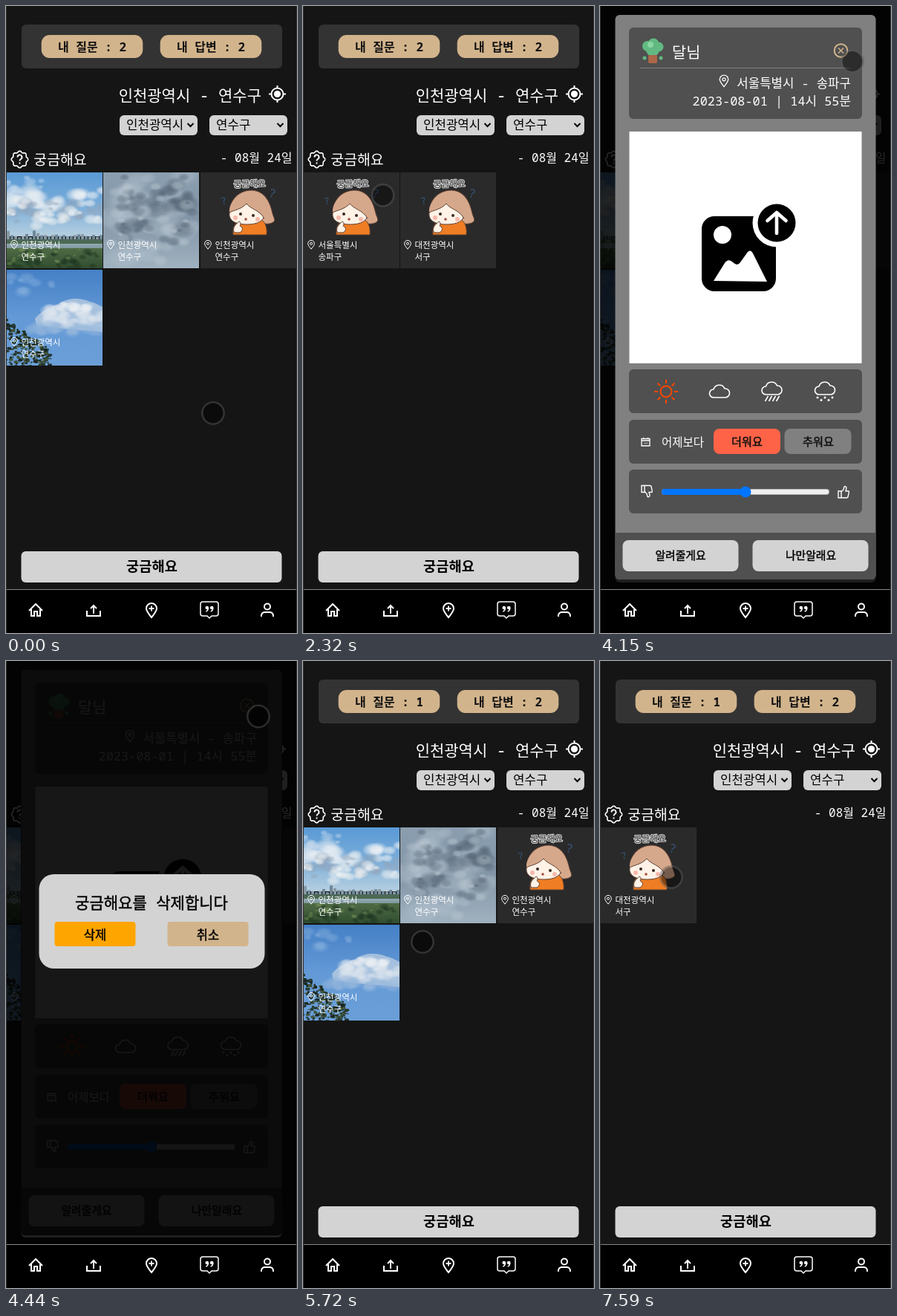
Animation of 392x844 px, one loop 8 s. Source, as an HTML page with a canvas:

```html
<!DOCTYPE html>
<html lang="ko">
<head>
<meta charset="utf-8">
<title>궁금해요</title>
<style>
html, body { margin: 0; width: 100%; height: 100%; overflow: hidden; background: #151515; }
canvas { display: block; width: 392px; height: 844px; }
</style>
</head>
<body>
<canvas id="stage" width="392" height="844"></canvas>
<script>
const W = 392, H = 844, LOOP = 8000, TILE = 129;
const TAN = '#d2b48c', LIGHT = '#d3d3d3', PANEL = '#505050', GRAY = '#808080';
const FONT = '"Noto Sans Mono", "Noto Sans CJK KR", "Noto Sans CJK", monospace';
let g = document.getElementById('stage').getContext('2d');

// ---------- helpers ----------
function box(x, y, w, h, r, fill) {
  g.fillStyle = fill;
  g.beginPath();
  g.roundRect(x, y, w, h, r);
  g.fill();
}

function disc(x, y, r, fill) {
  g.fillStyle = fill;
  g.beginPath();
  g.arc(x, y, r, 0, 7);
  g.fill();
}

function ring(x, y, r, width, color) {
  g.strokeStyle = color;
  g.lineWidth = width;
  g.beginPath();
  g.arc(x, y, r, 0, 7);
  g.stroke();
}

// y is the optical middle of the line; 500 is regular with a hairline outline
function text(s, x, y, size, color = '#fff', align = 'left', weight = 400) {
  g.font = `${weight} ${size}px ${FONT}`;
  g.textAlign = align;
  g.fillStyle = color;
  g.fillText(s, x, y + size * 0.37);
  if (weight === 500) {
    g.strokeStyle = color;
    g.lineWidth = 0.45;
    g.strokeText(s, x, y + size * 0.37);
  }
}

function at(x, y, draw, sx = 1, sy = sx) {
  g.save();
  g.translate(x, y);
  g.scale(sx, sy);
  draw();
  g.restore();
}

function line(d, color = '#fff', width = 2) {
  g.strokeStyle = color;
  g.lineWidth = width;
  g.stroke(new Path2D(d));
}

function shape(d, fill, edge) {
  g.fillStyle = fill;
  g.fill(new Path2D(d));
  if (edge) line(d, edge, 1);
}

function random(seed) {
  return () => {
    seed = (seed + 0x6d2b79f5) | 0;
    let v = Math.imul(seed ^ (seed >>> 15), 1 | seed);
    v = (v + Math.imul(v ^ (v >>> 7), 61 | v)) ^ v;
    return ((v ^ (v >>> 14)) >>> 0) / 4294967296;
  };
}

// ---------- pictures ----------
function picture(draw) {
  const c = document.createElement('canvas'), main = g;
  c.width = c.height = TILE;
  g = c.getContext('2d');
  draw();
  g = main;
  return c;
}

function gradient(y, h, ...colors) {
  const fill = g.createLinearGradient(0, y, 0, y + h);
  colors.forEach((c, i) => fill.addColorStop(i / (colors.length - 1), c));
  g.fillStyle = fill;
  g.fillRect(0, y, TILE, h);
}

function puff(x, y, rx, ry, rgb, a) {
  at(x, y, () => {
    const fill = g.createRadialGradient(0, 0, 0, 0, 0, 1);
    fill.addColorStop(0, `rgba(${rgb},${a})`);
    fill.addColorStop(0.55, `rgba(${rgb},${a * 0.75})`);
    fill.addColorStop(1, `rgba(${rgb},0)`);
    disc(0, 0, 1, fill);
  }, rx, ry);
}

function puffs(seed, n, x, y, w, h, size, rgb, a) {
  const rnd = random(seed);
  for (let i = 0; i < n; i++) {
    const r = size * (0.5 + rnd());
    puff(x + rnd() * w, y + rnd() * h, r * 1.5, r, rgb, a);
  }
}

const river = picture(() => {
  gradient(0, 86, '#5a9ad6', '#79acd9', '#b5cfe0');
  puffs(5, 22, 0, 24, 129, 24, 8, '234,239,243', 0.7);
  puffs(6, 7, 0, 6, 50, 14, 5, '205,222,237', 0.5);
  puffs(8, 24, 0, 40, 129, 26, 6, '146,164,184', 0.55);
  puffs(3, 26, 0, 36, 129, 38, 5, '238,241,242', 0.65);
  const rnd = random(4);
  for (let x = 0; x < TILE; x += 5) {
    const h = 3 + rnd() * (x < 45 ? 10 : 5);
    box(x, 91 - h, 4, h, 0, x % 2 ? '#6f8798' : '#8799a5');
  }
  gradient(90, 6, '#4d685d', '#4b6a4c');
  gradient(96, 7, '#93abb3', '#7c949b');
  gradient(102, 27, '#4f6b45', '#304d30');
  puffs(9, 34, 0, 106, 129, 23, 3.5, '30,53,32', 0.6);
  puffs(12, 20, 0, 104, 129, 20, 2.5, '115,142,85', 0.6);
});

const overcast = picture(() => {
  gradient(0, TILE, '#8b9eaf', '#8295a6', '#a0b2c0');
  puffs(21, 26, 0, 0, 129, 125, 12, '176,191,204', 0.5);
  puffs(34, 26, 15, 5, 100, 95, 9, '82,98,115', 0.5);
  puffs(40, 22, 10, 15, 110, 105, 6, '190,202,211', 0.5);
  puffs(43, 16, 20, 10, 100, 80, 5, '74,89,106', 0.4);
});

const summer = picture(() => {
  gradient(0, TILE, '#4580c6', '#6399d6', '#6b9fd8');
  puffs(51, 9, 0, 8, 70, 22, 6, '150,187,226', 0.4);
  shape('M38 66C48 54 60 50 72 45C84 37 100 38 112 43C121 45 126 49 129 50V84C100 80 70 81 40 74Z', 'rgba(190,207,226,.75)');
  puffs(55, 26, 52, 50, 77, 22, 7, '222,230,238', 0.6);
  puffs(58, 12, 70, 42, 40, 12, 6, '233,238,243', 0.7);
  puffs(60, 16, 25, 73, 104, 12, 6, '150,183,220', 0.6);
  const rnd = random(77);
  for (let i = 0; i < 260; i++) {
    const x = rnd() * 60, y = 64 + x * 0.7 + rnd() * (66 - x * 0.7);
    box(x - 4, y, 1 + rnd() * 5, 1 + rnd() * 3, 1, ['#26372b', '#40543a', '#1b2923'][i % 3]);
  }
});

const girl = picture(() => {
  const hair = '#d6a88b', edge = '#604235', skin = '#fff2e7';
  box(0, 0, TILE, TILE, 0, '#2a2a2a');
  at(66, 15, () => {
    g.rotate(-0.03);
    g.font = `400 11.7px ${FONT}`;
    g.textAlign = 'center';
    g.lineJoin = 'round';
    g.strokeStyle = '#d4d4d4';
    g.lineWidth = 2.2;
    g.strokeText('궁금해요', 0, 4.5);
    text('궁금해요', 0, 0.2, 11.7, '#2b2b2b', 'center');
  });
  at(31, 38, () => { g.rotate(-0.25); text('?', 0, 0, 13, '#35557d', 'center'); });
  at(97, 28, () => { g.rotate(0.2); text('?', 0, 0, 16, '#35557d', 'center'); });
  shape('M40 60C36 40 50 24 69 24C88 25 94 42 97 55C98 60 102 64 98 67C92 71 84 68 78 70L44 66Z', hair, edge);
  shape('M44 84C43 74 46 66 56 65L82 64C88 67 90 76 89 84Z', '#ef7d23', edge);
  shape('M39 55C41 45 50 41 63 41C77 41 86 48 86 56C86 65 77 70 63 70C47 70 38 65 39 55Z', skin, edge);
  shape('M39 54C44 51 55 50 62 42C68 50 79 50 86 62C92 60 93 47 87 38C80 26 64 24 54 30C43 36 38 46 39 54Z', hair);
  line('M39 54C44 51 55 50 62 42C68 50 79 50 86 62', edge, 1);
  disc(54, 56, 2, '#3b2924');
  disc(71, 58, 2, '#3b2924');
  disc(47, 61, 3, '#f7b9ac');
  disc(77, 63, 3, '#f7b9ac');
  disc(61, 63, 1.8, '#a74c40');
  shape('M45 80C43 73 48 70 52 66C55 67 54 71 53 72C58 74 57 79 53 81H46Z', skin, edge);
});

// ---------- icons ----------
const PIN = 'M0 10C-5 4-7 1-7-2A7 7 0 0 1 7-2C7 1 5 4 0 10Z';
const CLOUD = 'M-8 9A5.5 5.5 0 0 1-8-2A8 8 0 0 1 7-3A6 6 0 0 1 8 9Z';
const THUMB = 'M-7-1H-3V8H-7ZM-3 0L0-3L1-7Q4-8 4-5L3-1H7Q8 0 7 2L6 7Q5 8 4 8H-3';

function pin(x, y, scale) {
  at(x, y, () => { line(PIN, '#fff', 1.6); ring(0, -2, 2.5, 1.5, '#fff'); }, scale);
}

function badge() {
  g.beginPath();
  for (let i = 0; i <= 96; i++) {
    const a = i / 96 * Math.PI * 2, r = 10.4 + 0.9 * Math.cos(a * 8);
    g.lineTo(18.5 + r * Math.cos(a), 206.5 + r * Math.sin(a));
  }
  g.strokeStyle = '#fff';
  g.lineWidth = 1.6;
  g.stroke();
  at(18.5, 206, () => line('M-3-2.5A3 3 0 1 1 1.5 0Q0 1 0 2.5M0 4.5V6.5', '#fff', 1.9));
}

function locator() {
  at(365.5, 118.5, () => {
    ring(0, 0, 8, 2, '#fff');
    disc(0, 0, 4.6, '#fff');
    line('M0-11.5V-8M0 8V11.5M-11.5 0H-8M8 0H11.5');
  });
}

function nav() {
  box(0, 785, W, 59, 0, '#000');
  box(0, 785, W, 1, 0, '#888');
  at(40, 813, () => line('M-9 1L0-8L9 1M-6-1V8H-2V2H2V8H6V-1'));
  at(118, 814, () => line('M-9 0V7H9V0M0 4V-6M-4-3L0-7L4-3'));
  at(196, 813, () => line(PIN + 'M-3.5-2H3.5M0-5.5V1.5'));
  at(274, 813, () => {
    line('M-9-11H9Q12-11 12-8V5Q12 8 9 8H3L0 11L-3 8H-9Q-12 8-12 5V-8Q-12-11-9-11Z', '#fff', 1.5);
    for (const x of [-3.2, 3.2]) {
      disc(x, -3, 2.3, '#fff');
      at(x, -3, () => line('M1.6 0Q1.6 4-1.5 5', '#fff', 1.5));
    }
  });
  at(352, 813, () => {
    ring(0, -4.5, 4, 2, '#fff');
    line('M-8 9V7A5 5 0 0 1-3 3H3A5 5 0 0 1 8 7V9');
  });
}

// ---------- screens ----------
const home = [
  [river, '인천광역시', '연수구'],
  [overcast, '인천광역시', '연수구'],
  [girl, '인천광역시', '연수구'],
  [summer, '인천광역시', '연수구']
];
const mine = [[girl, '서울특별시', '송파구'], [girl, '대전광역시', '서구']];

function select(x, label) {
  box(x, 147, 105, 27, 6, LIGHT);
  text(label, x + 9, 160, 16.8, '#000', 'left', 300);
  at(x + 95.5, 160, () => line('M-4-2L0 2L4-2', '#000'));
}

function page(tiles, questions) {
  box(0, 0, W, H, 0, '#151515');
  box(21, 25, 351, 59, 6, '#333');
  [[47.7, '내 질문 : ' + questions], [207.7, '내 답변 : 2']].forEach(([x, s]) => {
    box(x, 39, 136.6, 31, 11, TAN);
    text(s, x + 68.3, 55.5, 16, '#111', 'center', 600);
  });
  text('인천광역시 - 연수구', 344, 120, 21, '#fff', 'right');
  locator();
  select(153, '인천광역시');
  select(274, '연수구');
  badge();
  text('궁금해요', 37.3, 206.6, 19.4);
  text('- 08월 24일', 385.5, 204.5, 16, '#fff', 'right');
  tiles.forEach(([image, city, area], i) => {
    const x = 1 + i % 3 * 130.5 | 0, y = 224 + Math.floor(i / 3) * 131;
    g.drawImage(image, x, y, TILE, TILE);
    pin(x + 10, y + 97, 0.62);
    text(city, x + 19.5, y + 98, 11.5);
    text(area, x + 19.5, y + 114, 11.5);
  });
  box(20.5, 734, 351, 42, 6, LIGHT);
  text('궁금해요', 196.5, 754, 18.7, '#000', 'center', 600);
}

function tree() {
  for (const [x, y, r] of [[64, 54, 7], [72, 51, 7.5], [79, 55, 6.5], [71, 59, 9]]) disc(x, y, r, '#62b982');
  disc(68, 52, 4, '#8ad6a2');
  box(65, 66, 12, 11, 2, '#ad6648');
  disc(60, 70, 2.5, '#62b982');
  disc(82, 70, 2.5, '#62b982');
}

function upload() {
  box(39.5, 169, 313, 312, 0, '#fff');
  box(137, 283, 100, 101, 17, '#000');
  disc(165, 308, 12, '#fff');
  shape('M153 370L168 346Q173 339 179 345Q185 351 189 345L199 331Q203 327 206 333L225 371Z', '#fff');
  disc(238, 292, 32.5, '#fff');
  disc(238, 292, 25.5, '#000');
  g.lineCap = g.lineJoin = 'round';
  line('M238 306V278M225.5 289L238 278L250.5 289', '#fff', 4.6);
  g.lineCap = 'butt';
  g.lineJoin = 'miter';
}

function weather() {
  box(39, 489, 314, 59, 6, PANEL);
  at(89, 519, () => {
    ring(0, 0, 7.5, 2, '#ff4500');
    for (let i = 0; i < 8; i++) {
      line('M0-11V-16', '#ff4500');
      g.rotate(Math.PI / 4);
    }
  });
  at(161, 518, () => line(CLOUD, '#fff', 1.6));
  at(231.5, 514, () => {
    line(CLOUD, '#fff', 1.6);
    for (let x = -7; x < 9; x += 5) line(`M${x + 2} 11L${x - 2} 18`, '#fff', 1.6);
  });
  at(303, 514, () => {
    line(CLOUD, '#fff', 1.6);
    for (let i = 0; i < 5; i++) disc(-10 + i * 5, i % 2 ? 16.5 : 13, 1.5, '#fff');
  });
}

function sheet() {
  box(1, 0, 390, 785, 0, 'rgba(0,0,0,.85)');
  box(20.5, 12, 351, 760, 6, GRAY);
  box(39, 29, 314, 123, 6, PANEL);
  tree();
  text('달님', 97, 62, 20.8);
  ring(324.5, 60, 8.8, 2, TAN);
  at(324.5, 60, () => line('M-3.5-3.5L3.5 3.5M3.5-3.5L-3.5 3.5', TAN, 1.5));
  box(54, 83, 283, 1, 0, GRAY);
  pin(167, 100.5, 0.82);
  text('서울특별시 - 송파구', 338, 104, 16.8, '#fff', 'right');
  text('2023-08-01 | 14시 55분', 338, 127.5, 16.9, '#fff', 'right');
  upload();
  weather();

  box(39, 557, 314, 59, 6, PANEL);
  at(61.5, 587, () => {
    line('M-5.5-4.5H5.5V5H-5.5ZM-5.5-2H5.5M-3-6V-4M3-6V-4', '#fff', 1.3);
    line('M-2.5 1.5H3', '#bbb', 1);
  });
  text('어제보다', 83, 587.5, 15.5);
  box(153, 569, 90, 34, 8, '#ff6347');
  text('더워요', 198, 586.5, 15.2, '#111', 'center', 500);
  box(248.5, 569, 90, 34, 8, GRAY);
  text('추워요', 294, 586.5, 15.2, '#111', 'center', 500);

  box(39, 624, 314, 59, 6, PANEL);
  at(63, 653.5, () => line(THUMB, '#fff', 1.4), 1, -1);
  at(328, 654, () => line(THUMB, '#fff', 1.4));
  box(83, 650, 226, 8, 4, '#b2b2b2');
  box(84, 651, 224, 6, 3, '#efefef');
  box(83, 650, 113, 8, 4, '#0075ff');
  disc(196, 654, 7.5, '#0075ff');

  box(20.5, 709, 351, 63, [0, 0, 6, 6], PANEL);
  box(30.5, 719, 156, 42, 8, LIGHT);
  text('알려줄게요', 108.5, 740, 14.8, '#000', 'center', 500);
  box(205.5, 719, 156, 42, 8, LIGHT);
  text('나만알래요', 284, 740, 14.8, '#000', 'center', 500);
}

function dialog() {
  box(20, 12, 352, 761, 6, 'rgba(0,0,0,.91)');
  box(44.5, 287, 304, 127, 20, LIGHT);
  text('궁금해요를 삭제합니다', 196, 325, 21, '#000', 'center', 500);
  box(65.5, 351, 109, 33, 4, '#ffa500');
  text('삭제', 120, 369, 16.5, '#000', 'center', 500);
  box(217.5, 351, 109, 33, 4, TAN);
  text('취소', 272, 369, 16.5, '#000', 'center', 500);
}

// ---------- pointer ----------
// first step, last step, step count, target, optional bend of the path
const moves = [
  { from: 290, to: 1060, n: 9, x: 196, y: 76 },
  { from: 1160, to: 1440, n: 4, x: 183, y: 68 },
  { from: 1930, to: 2500, n: 7, x: 89, y: 301 },
  { from: 3090, to: 3860, n: 9, x: 335, y: 113 },
  { from: 3960, to: 4150, n: 3, x: 340, y: 74.5, bend: 5 },
  { from: 4540, to: 5030, n: 6, x: 161, y: 378 },
  { from: 6010, to: 6510, n: 6, x: 159, y: 63, bend: -14 },
  { from: 6910, to: 7300, n: 5, x: 96, y: 327 },
  { from: 7490, to: 7590, n: 2, x: 96, y: 291 }
];

function pointer(t) {
  let x = 279, y = 548;
  for (const m of moves) {
    if (t < m.from) break;
    const gap = (m.to - m.from) / (m.n - 1);
    const k = Math.min(m.n, Math.floor((t - m.from) / gap + 0.05) + 1) / m.n;
    const e = k * k * (3 - 2 * k);
    x += (m.x - x) * e + (m.bend || 0) * 2 * e * (1 - e);
    y += (m.y - y) * e;
  }
  disc(x, y, 13.5, 'rgba(0,0,0,.45)');
  ring(x, y, 14.7, 2.6, 'rgba(88,88,88,.45)');
}

// ---------- timeline ----------
function render(t) {
  if (t < 1640) page(home, 2);
  else if (t < 2700) page(mine, 2);
  else if (t < 5230) {
    page(home, 2);
    sheet();
    if (t >= 4440) dialog();
  }
  else if (t < 6710) page(home, 1);
  else page(mine.slice(1), 1);
  nav();
  box(0, 0, 1, H, 0, '#303030');
  box(391, 0, 1, H, 0, '#303030');
  pointer(t);
}

const start = performance.now();
function frame() {
  render((performance.now() - start) % LOOP);
  requestAnimationFrame(frame);
}
frame();
</script>
</body>
</html>
```
